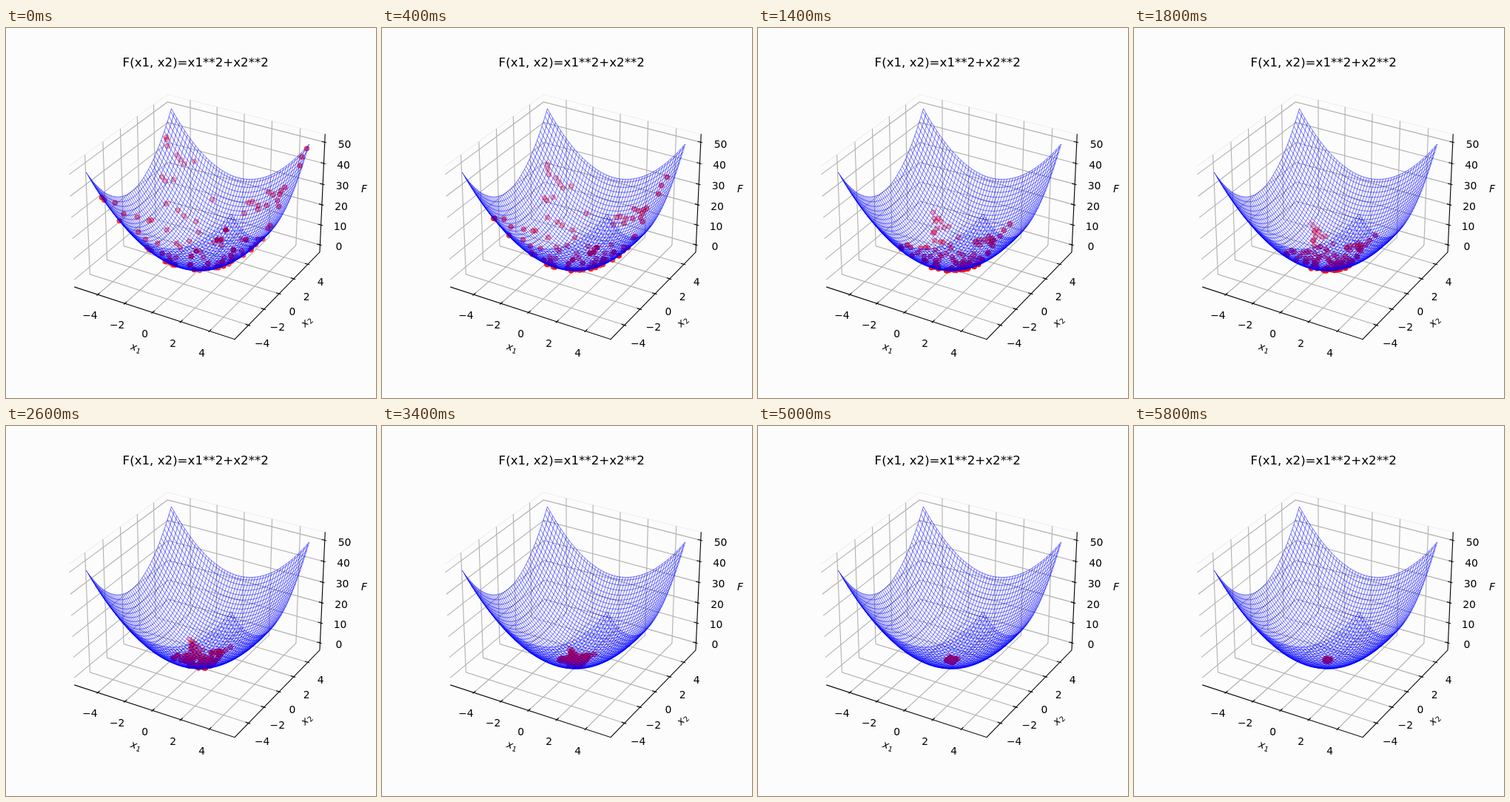
An HTML page with a canvas for the animation above (6 s loop, 500x500 px).

```html
<!DOCTYPE html>
<html>
<head>
<meta charset="utf-8">
<style>
html, body { margin: 0; width: 100%; height: 100%; overflow: hidden; background: #fcfcfc; }
canvas { display: block; }
</style>
</head>
<body>
<canvas id="c" width="500" height="500"></canvas>
<script>
const ctx = document.getElementById('c').getContext('2d');
const FONT = '"DejaVu Sans", sans-serif';
const PT = 100 / 72;
const STEP = 200, STEPS = 30;

// Perspective camera: elevation 30°, azimuth -60°, distance 10
const CX = 261.45, CY = 247.3, ZOOM = 2081.08, DIST = 10;
const SXY = 1.14286 / 11, SZ = 0.857145 / 55;
const C = Math.sqrt(3) / 2;
const RIGHT = [C, 0.5, 0], UP = [-0.25, C / 2, C], EYE = [C / 2, -0.75, 0.5];
const dot = (a, b) => a[0] * b[0] + a[1] * b[1] + a[2] * b[2];

function project(x, y, z) {
  const p = [x * SXY, y * SXY, (z - 25) * SZ];
  const depth = DIST - dot(EYE, p);
  return [CX + ZOOM * dot(RIGHT, p) / depth, CY - ZOOM * dot(UP, p) / depth, depth];
}

let seed = 7;
function rand() {
  seed = (seed * 16807) % 2147483647;
  return seed / 2147483647;
}

// A few outermost points, the others spread evenly over the square
const points = [[4.9, 4.9], [-4.25, -4.25], [-4, 4]];
while (points.length < 108) points.push([9.6 * rand() - 4.8, 9.6 * rand() - 4.8]);
const rates = points.map(() => 0.9 + 0.2 * rand());

function polyline(path, pts) {
  pts.forEach((p, i) => {
    const [x, y] = project(...p);
    i ? path.lineTo(x, y) : path.moveTo(x, y);
  });
}

const mesh = new Path2D(), grid = new Path2D(), axes = new Path2D(), panes = new Path2D();

// Every second of 100 sample lines, and the last one
const samples = Array.from({ length: 100 }, (_, i) => -5 + 10 * i / 99);
for (const u of samples.filter((_, i) => i % 2 === 0 || i === 99)) {
  polyline(mesh, samples.map(v => [v, u, u * u + v * v]));
  polyline(mesh, samples.map(v => [u, v, u * u + v * v]));
}

const L = 5.5 * 25 / 24, Z0 = 25 - 27.5 * 25 / 24, Z1 = 25 + 27.5 * 25 / 24;
const OUT = 0.092, IN = 0.183, PAD = 1.1;
const labels = [];
function label(text, pos, dx, dy) {
  const [x, y] = project(...pos);
  labels.push([String(text).replace('-', '\u2212'), x + dx, y + dy]);
}
for (let t = -4; t <= 4; t += 2) {
  polyline(grid, [[t, -L, Z0], [t, L, Z0], [t, L, Z1]]);
  polyline(grid, [[L, t, Z0], [-L, t, Z0], [-L, t, Z1]]);
  polyline(axes, [[t, -L - OUT, Z0], [t, -L + IN, Z0]]);
  polyline(axes, [[L + OUT, t, Z0], [L - IN, t, Z0]]);
  label(t, [t, -L - PAD, Z0 - 5 * PAD], 2, 1.6);
  label(t, [L + PAD, t, Z0 - 5 * PAD], -3, 2.5);
}
for (let z = 0; z <= 50; z += 10) {
  polyline(grid, [[-L, -L, z], [-L, L, z], [L, L, z]]);
  polyline(axes, [[L + OUT, L, z], [L - IN, L, z]]);
  label(z, [L + PAD, L + PAD, z], -5, 6.3);
}
polyline(axes, [[-L, -L, Z0], [L, -L, Z0], [L, L, Z0], [L, L, Z1]]);
polyline(panes, [[-L, -L, Z1], [-L, L, Z1], [L, L, Z1]]);

function stroke(path, color, width, cap = 'butt') {
  ctx.strokeStyle = color;
  ctx.lineWidth = width * PT;
  ctx.lineCap = cap;
  ctx.stroke(path);
}

function text(str, x, y, pt, style = '') {
  ctx.font = `${style} ${pt * PT}px ${FONT}`;
  ctx.fillText(str, x, y);
}

function axisName(name, sub, x, y, deg) {
  ctx.save();
  ctx.translate(x, y);
  ctx.rotate(deg * Math.PI / 180);
  text(name, sub ? -3.5 : 0, 4.5, 10, 'italic');
  if (sub) text(sub, 4, 6.8, 7);
  ctx.restore();
}

function drawPoints(step) {
  const decay = 0.08 * step + 0.0018 * step * step;
  const dots = points.map(([x, y], i) => {
    const s = Math.exp(-decay * rates[i]);
    return project(x * s, y * s, (x * x + y * y) * s * s);
  }).sort((a, b) => b[2] - a[2]);
  const far = 1 / dots[0][2], near = 1 / dots[dots.length - 1][2];
  ctx.fillStyle = ctx.strokeStyle = '#f00';
  ctx.lineWidth = PT;
  for (const [x, y, depth] of dots) {
    // Nearer dots are more opaque
    ctx.globalAlpha = 0.3 + 0.7 * (1 / depth - far) / (near - far);
    ctx.beginPath();
    ctx.arc(x, y, Math.sqrt(20) / 2 * PT, 0, 2 * Math.PI);
    ctx.fill();
    ctx.stroke();
  }
  ctx.globalAlpha = 1;
}

function draw() {
  const step = Math.floor(performance.now() / STEP) % STEPS;
  ctx.fillStyle = '#fcfcfc';
  ctx.fillRect(0, 0, 500, 500);
  stroke(panes, '#eee', 0.8);
  stroke(grid, '#b0b0b0', 0.8);
  stroke(axes, '#000', 0.8, 'square');
  drawPoints(step);
  stroke(mesh, '#00f', 0.4);

  ctx.fillStyle = '#000';
  ctx.textAlign = 'center';
  text('F(x1, x2)=x1**2+x2**2', 256.25, 52, 12);
  for (const [str, x, y] of labels) text(str, x, y + 5, 10);
  axisName('x', '1', 176, 432, 18);
  axisName('x', '2', 406, 396.5, -45.7);
  axisName('F', '', 484, 217.5, 0);
  requestAnimationFrame(draw);
}
draw();
</script>
</body>
</html>
```
